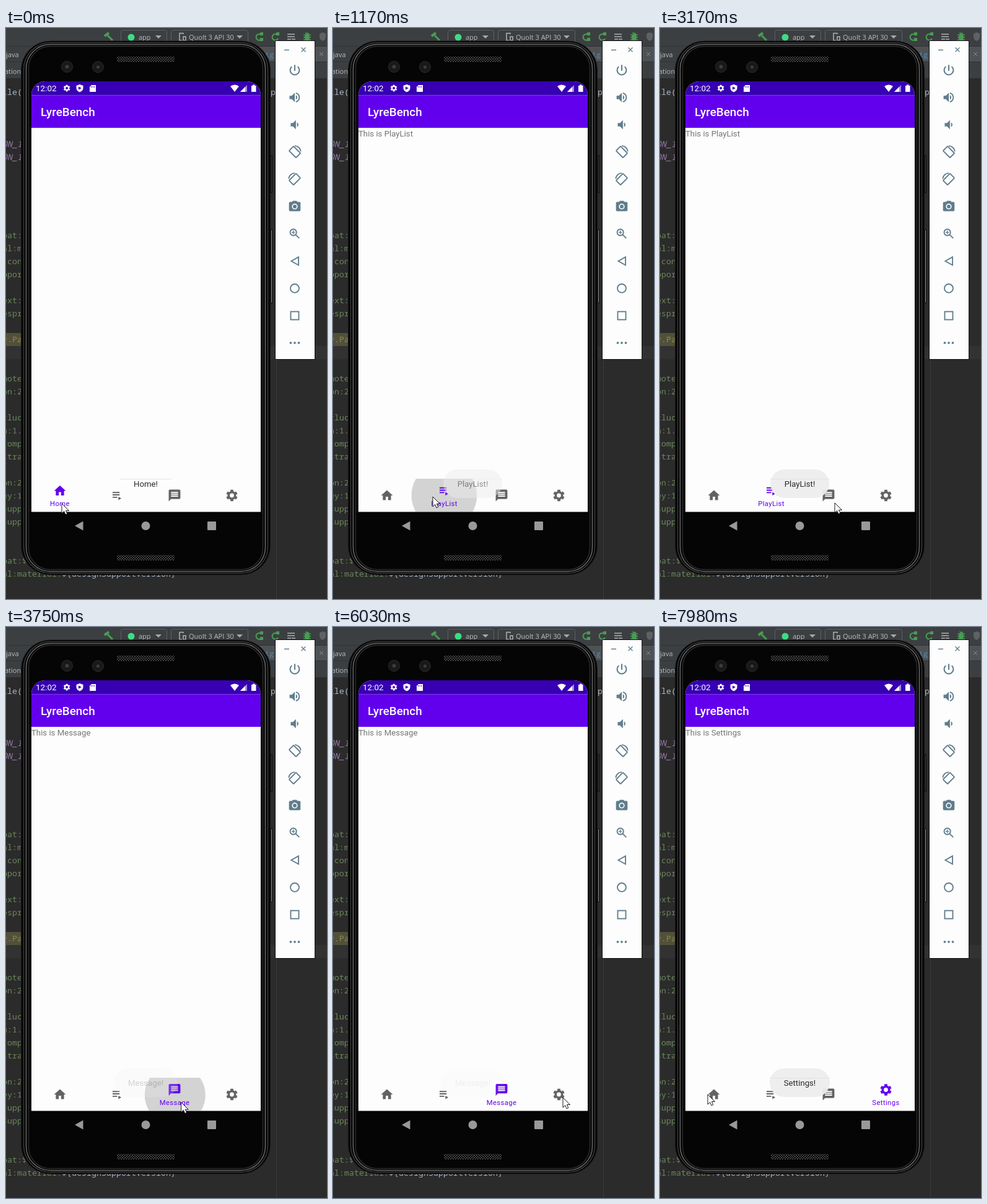
An HTML page for the animation above (8000 ms loop, 518 by 921 pixels).

```html
<!DOCTYPE html>
<html lang="en">
<head>
<meta charset="utf-8">
<title>Bottom navigation demo</title>
<style>
  html, body { margin: 0; height: 100%; overflow: hidden; background: #2b2b2b; }
  svg { display: block; width: 100vw; height: 100vh; }
  .ui { font: 11px "Open Sans", sans-serif; fill: #bbb; }
  .code { font: 13.33px "Noto Sans Mono", monospace; fill: #6a8759; white-space: pre; }
  .app { font: 13.2px Roboto, sans-serif; }
  .line { fill: none; stroke: currentColor; stroke-width: 2; }
</style>
</head>
<body>
<svg viewBox="0 0 518 921" preserveAspectRatio="none">
  <defs>
    <clipPath id="screen"><path d="M41 780.500V108a22 22 0 0 1 22-22H389a22 22 0 0 1 22 22V780.500z"/></clipPath>
    <clipPath id="bar"><path d="M41 727H411V780.500H41z"/></clipPath>
    <pattern id="mesh" width="4" height="4" patternUnits="userSpaceOnUse">
      <path d="M0 0l4 4M4 0l-4 4" stroke="#474747" stroke-width=".9"/>
    </pattern>
    <g id="home"><path d="M10 20v-6h4v6h5v-8h3L12 3 2 12h3v8z"/></g>
    <g id="playlist"><path d="M4 10h12v2H4zM4 6h12v2H4zM4 14h8v2H4zM14 14v6l5-3z"/></g>
    <g id="message"><path fill-rule="evenodd" d="M20 2H4a2 2 0 0 0-2 2V22l4-4h14a2 2 0 0 0 2-2V4a2 2 0 0 0-2-2zM18 14H6v-2h12zM18 11H6V9h12zM18 8H6V6h12z"/></g>
    <g id="gear" fill="none" stroke="currentColor">
      <circle cx="12" cy="12" r="5.500" stroke-width="3.800"/>
      <path id="tooth" stroke-width="5" d="M12 2.300v4M12 17.700v4"/>
      <use href="#tooth" transform="rotate(60 12 12)"/>
      <use href="#tooth" transform="rotate(120 12 12)"/>
    </g>
    <g id="power" class="line"><path d="M12 3v10M17.100 5.900a8 8 0 1 1-10.200 0" stroke-width="2.200"/></g>
    <g id="louder"><path d="M3 9v6h4l5 5V4L7 9zM14 8v8a4.500 4.500 0 0 0 0-8z"/><path class="line" d="M14 4.300a8 8 0 0 1 0 15.400"/></g>
    <g id="quieter"><path d="M5 9v6h4l5 5V4L9 9zM16 8v8a4.500 4.500 0 0 0 0-8z"/></g>
    <g id="rotate" class="line">
      <rect x="6.500" y="3.500" width="11" height="17" rx="1" transform="rotate(-45 12 12)"/>
      <path d="M12 1.500A10.500 10.500 0 0 1 22.500 11"/>
    </g>
    <g id="unrotate"><use href="#rotate" transform="matrix(-1 0 0 1 24 0)"/></g>
    <g id="camera"><path fill-rule="evenodd" d="M9 2L7.200 4H4a2 2 0 0 0-2 2v12a2 2 0 0 0 2 2h16a2 2 0 0 0 2-2V6a2 2 0 0 0-2-2h-3.200L15 2zM7 12a5 5 0 0 0 10 0a5 5 0 0 0-10 0z"/><circle cx="12" cy="12" r="3.200"/></g>
    <g id="zoom" class="line"><circle cx="9.500" cy="9.500" r="5.500"/><path d="M13.800 13.800l6 6"/><path d="M6.500 9.500h6M9.500 6.500v6" stroke-width="1.500"/></g>
    <g id="back" class="line"><path d="M18.500 5v14L6 12z"/></g>
    <g id="circle" class="line"><circle cx="12" cy="12" r="7.500"/></g>
    <g id="square" class="line"><rect x="5" y="5" width="14" height="14"/></g>
    <g id="more"><circle cx="5" cy="12" r="2"/><circle cx="12" cy="12" r="2"/><circle cx="19" cy="12" r="2"/></g>
  </defs>

  <!-- Editor behind the emulator -->
  <path fill="#2b2b2b" d="M0 0H518V921H0z"/>
  <path fill="#3c3f41" d="M0 0H518V81H0z"/>
  <path fill="#4e5254" d="M400 30H518V54H400z"/>
  <path stroke="#323232" d="M0 29.500H518M0 54.500H518"/>
  <path fill="#323232" d="M0 513H518V534H0z"/>
  <path fill="#52503a" d="M0 492H30V513H0z"/>
  <path stroke="#3b3b3b" d="M436.500 534V921"/>
  <g id="code"></g>
  <g class="ui">
    <text x="0" y="47">java</text>
    <text x="-2" y="74">ation</text>
    <text x="413" y="47" fill="#5a93c4">ld.g</text>
    <g fill="none" stroke="#5e6163"><rect x="185.500" y="3.500" width="74" height="23" rx="3"/><rect x="266.500" y="3.500" width="124" height="23" rx="3"/></g>
    <circle cx="202" cy="15" r="5.500" fill="#3ddc84"/>
    <text x="214" y="19">app</text>
    <text x="295" y="19">Quolt 3 API 30</text>
    <path fill="#a5a8aa" d="M241 12h10l-5 5zM372 12h10l-5 5z"/>
    <g fill="none" stroke="#afb1b3" stroke-width="1.500">
      <path d="M286 10V8.500h-6V20h4M286 14h4v6h-4z"/>
      <path d="M454 10h12M454 14h12M454 18h6M461 18h6"/>
      <path d="M506 39l6 6M512 39l-6 6" stroke="#87898b" stroke-width="1"/>
    </g>
    <g fill="none" stroke="#499c54" stroke-width="2">
      <path d="M164 12l8 8" stroke-width="3"/><path d="M159 13l7-5" stroke-width="4"/>
      <path d="M412 11a5 5 0 1 0 1 6M438 11a5 5 0 1 0 1 6"/>
      <path d="M480 11h12M480 15h12M480 19h12M483 8l6 1" stroke-width="1.500"/>
    </g>
    <path fill="#499c54" d="M410 7h5v5h-5zM436 7h5v5h-5zM410 16h5v5h-5z"/>
    <ellipse cx="486" cy="15" rx="4" ry="6" fill="#499c54"/>
    <path fill="#5f6264" d="M506 9l5-2 5 2v5q0 5-5 7-5-2-5-7z"/>
  </g>

  <!-- Phone body -->
  <path stroke="#0b0b0b" stroke-width="4" d="M428 205V266M428 325V444"/>
  <path stroke="#999" d="M428.500 326V443"/>
  <path stroke="#444" d="M428.500 206V265"/>
  <g id="body"></g>
  <path fill="url(#mesh)" d="M179 46H272V55H179zM179 850H272V859H179z"/>
  <g fill="#191919" stroke="#2c2c2c"><circle cx="98.500" cy="62.500" r="9"/><circle cx="148.500" cy="63" r="9"/></g>
  <g fill="#3a3d40"><circle cx="98.500" cy="62.500" r="3"/><circle cx="148.500" cy="63" r="2.500"/></g>
  <g fill="#999"><path d="M111 803l13.500-7.500v15z"/><circle cx="225.500" cy="803" r="7"/><rect x="325" y="796" width="14" height="14" rx="1"/></g>

  <!-- App -->
  <g clip-path="url(#screen)" class="app">
    <path fill="#fdfdfd" d="M41 86H411V781H41z"/>
    <path fill="#3700b3" d="M41 86H411V108.500H41z"/>
    <path fill="#6200ee" d="M41 108.500H411V161H41z"/>
    <g fill="#fff" color="#fff">
      <text x="48" y="102" font-size="13.500">12:02</text>
      <text x="56" y="142" font-size="18.850" font-weight="500">LyreBench</text>
      <use href="#gear" transform="translate(91.500 90.500) scale(.55)"/>
      <path d="M119 91l5.500 2v4q0 4-5.500 6.500-5.500-2.500-5.500-6.500v-4z"/>
      <path d="M138 92h7v11h-10v-8z"/>
      <path d="M362 94q7-5 14 0l-7 9zM396 93h2v-1.500h3.500V93h2v10h-7.500z"/>
      <path d="M378 103l11-11v11z" fill-opacity=".55"/><path d="M378 103l8-8v8z"/>
    </g>
    <g fill="#3700b3"><path d="M117 94.500l5 2.500-5 2.500z"/><path d="M137 94h1v2h-1zM139.500 94h1v2h-1zM142 94h1v2h-1z"/></g>
    <text id="page" x="41" y="175" fill="#757575"></text>
    <g clip-path="url(#bar)"><circle id="ripple" fill="#000"/></g>
    <g id="tabs"></g>
    <g id="toast" text-anchor="middle">
      <rect id="bubble" y="712" height="46" rx="23" fill="#eee" fill-opacity=".95"/>
      <path id="edge" stroke="#e2e2e2"/>
      <text id="toastText" x="225.500" y="740" fill="#2b2b2b"></text>
    </g>
  </g>

  <!-- Emulator controls -->
  <rect x="434.500" y="20.500" width="64" height="514" fill="#fdfdfd" stroke="#111"/>
  <path stroke="#607d8b" stroke-width="1.300" fill="none" d="M449 35.500h8M476.500 31.500l7 7M483.500 31.500l-7 7"/>
  <g id="controls" fill="#607d8b" color="#607d8b"></g>

  <path id="cursor" d="M0 0V16l3.700-3.500 2.300 5.300 2.800-1.200-2.300-5.100h5z" fill="#fff" stroke="#000" stroke-width=".9"/>
</svg>

<script>
const NS = "http://www.w3.org/2000/svg";
const byId = id => document.getElementById(id);
const set = (el, attrs) => { for (const k in attrs) el.setAttribute(k, attrs[k]); return el; };
const add = (parent, tag, attrs, text = "") => {
  const el = set(document.createElementNS(NS, tag), attrs);
  el.textContent = text;
  return parent.appendChild(el);
};
const clamp = v => Math.min(1, Math.max(0, v));
const ramp = (t, from, to) => clamp((t - from) / (to - from));
const mix = (a, b, k) => a + (b - a) * k;

// Visible ends of the code lines
const codeLine = (text, y, style = "") => add(byId("code"), "text", { x: -6, y: y + 5, class: "code", style }, text);
const codeBlocks = [
  [334, "pat: al:m :con ppor"], [439, "ext: espr"], [565, "mote on:2"],
  [628, "cluc n:1. comp stra"], [733, "on:2 ey:1 supp supp"], [859, "pat:$ al:material:"]
];
for (const [y, words] of codeBlocks) words.split(" ").forEach((word, i) => codeLine(word, y + i * 21));
codeLine("ile(", 103, "fill:#a9b7c6");
codeLine("ON_1", 187, "fill:#9876aa;font-style:italic");
codeLine("ON_1", 208, "fill:#9876aa;font-style:italic");
codeLine("y.Pa", 502, "fill:#8a8a4e");
set(codeLine("p", 103, "fill:#a9b7c6"), { x: 427 });
set(codeLine("${designSupportVersion}", 880, "fill:#a9b7c6"), { x: 90 });

// Nested outlines of the phone: inset, line colour, line width
for (const [inset, stroke, width] of [[0, "#1a1a1a", 1], [4, "#3a3a3a", 1.5], [8, "#6a6a6a", 1.5], [12, "#2a2a2a", 1.5]]) {
  add(byId("body"), "rect", {
    x: 24.5 + inset, y: 21 + inset * .7, width: 402 - inset * 2, height: 861 - inset * 1.4,
    rx: 47 - inset, fill: "#050505", stroke, "stroke-width": width
  });
}

"power louder quieter rotate unrotate camera zoom back circle square more".split(" ").forEach((name, i) =>
  add(byId("controls"), "use", { href: "#" + name, transform: `translate(454.800 ${56.8 + i * 44}) scale(.93)` }));

const tabs = [
  { name: "Home", icon: "home", x: 87, toastWidth: 83, click: -1000, show: -400, hide: 780, hidden: 1000 },
  { name: "PlayList", icon: "playlist", x: 179.5, toastWidth: 95, click: 980, show: 1020, hide: 3170, hidden: 3440 },
  { name: "Message", icon: "message", x: 272, toastWidth: 103, click: 3620, show: 3690, hide: 5700, hidden: 6055 },
  { name: "Settings", icon: "gear", x: 364.5, toastWidth: 97, click: 6310, show: 6350, hide: 9000, hidden: 9300 }
];
for (const tab of tabs) {
  tab.image = add(byId("tabs"), "use", { href: "#" + tab.icon });
  tab.label = add(byId("tabs"), "text", {
    x: tab.x, y: 771, fill: "#6200ee", "text-anchor": "middle", "font-size": 11.3, "letter-spacing": .38
  }, tab.name);
}

const bursts = [
  [120, 1050, 8], [1170, 1470, 3], [2270, 3170, 8], [3320, 3440, 2], [3750, 4680, 8],
  [4800, 5730, 7], [5880, 6030, 2], [6420, 7410, 8], [7530, 7980, 4]
];
function snap(t) {
  const burst = bursts.findLast(b => b[0] <= t);
  if (!burst) return 0;
  const [start, end, count] = burst;
  const step = (end - start) / (count - 1);
  return Math.min(end, start + Math.floor((t - start) / step + .001) * step);
}

// Pointer path: time, x, y
const pointer = [
  [0, 90, 767], [390, 104, 775], [780, 142, 775], [1050, 161, 756], [2130, 161, 756],
  [2270, 164, 786], [2530, 192, 817], [2790, 240, 803], [3170, 282, 766], [4000, 283, 767],
  [4410, 297, 832], [4680, 345, 818], [4800, 350, 806], [5300, 366, 775], [5730, 371, 759],
  [6750, 371, 759], [7000, 352, 803], [7200, 295, 831], [7410, 224, 838], [7680, 150, 815], [7980, 77, 754]
];
function pointerAt(t) {
  const time = Math.max(0, t);
  const next = pointer.findIndex(p => p[0] > time);
  if (next < 0) return pointer.at(-1).slice(1);
  const [a, b] = [pointer[next - 1], pointer[next]];
  const k = ramp(time, a[0], b[0]);
  return [mix(a[1], b[1], k), mix(a[2], b[2], k)];
}

function draw(t) {
  const current = tabs.findLastIndex(tab => tab.click <= t);
  const tab = tabs[current];
  const elapsed = t - tab.click;
  const change = clamp(elapsed / 115);

  tabs.forEach((item, i) => {
    const active = i === current ? change : i === current - 1 ? 1 - change : 0;
    const color = active > .5 ? "#6200ee" : "#636363";
    set(item.image, {
      transform: `translate(${item.x - 11.3} ${mix(742.7, 735.2, active)}) scale(.942)`, fill: color, color
    });
    set(item.label, { opacity: active });
  });
  byId("page").textContent = current ? "This is " + tab.name : "";

  const spread = 1 - (1 - clamp(elapsed / 225)) ** 3;
  const [touchX, touchY] = pointerAt(tab.click);
  set(byId("ripple"), {
    cx: mix(touchX, tab.x, spread), cy: mix(touchY, 754, spread), r: 53 * spread,
    opacity: .165 * (1 - ramp(elapsed, 260, 480))
  });

  const notice = tabs.findLast(item => item.show <= t);
  const left = 225.5 - notice.toastWidth / 2;
  set(byId("toast"), { opacity: ramp(t, notice.show, notice.show + 300) * (1 - ramp(t, notice.hide, notice.hidden)) });
  set(byId("bubble"), { x: left, width: notice.toastWidth, opacity: notice === tabs[0] ? 0 : 1 });
  set(byId("edge"), { d: `M${left} 727.500h${notice.toastWidth}` });
  byId("toastText").textContent = notice.name + "!";

  set(byId("cursor"), { transform: `translate(${pointerAt(t).join(" ")})` });
}

const began = performance.now();
function loop() {
  draw(snap((performance.now() - began) % 8000));
  requestAnimationFrame(loop);
}
loop();
</script>
</body>
</html>
```
